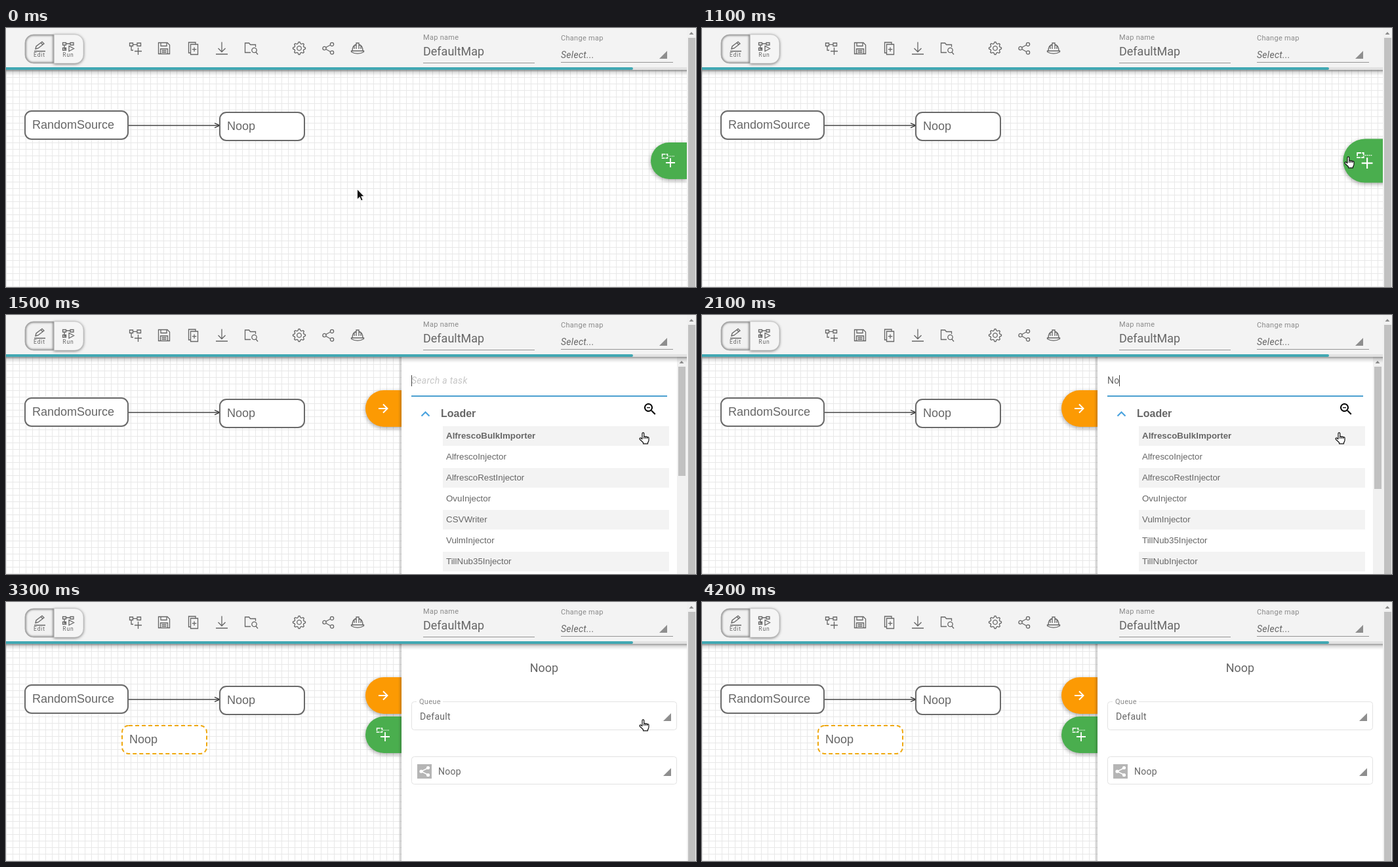
An HTML page for the animation above (5 s loop, 1052 px wide and 396 px high).

```html
<!DOCTYPE html>
<html lang="en">
<head>
<meta charset="utf-8">
<title>Adding a task to a map</title>
<style>
html, body { margin: 0; width: 100%; height: 100%; overflow: hidden; background: #fff; }
svg { display: block; }
text { font-family: Roboto, sans-serif; font-size: 14px; letter-spacing: .3px; fill: #666; white-space: pre; }
.tiny { font-size: 8.5px; letter-spacing: .9px; }
.label { font-size: 11px; fill: #8a8a8a; }
.big { font-size: 18px; letter-spacing: 0; }
.hint { font-style: italic; }
.node, .row, .head { font-family: "Liberation Sans", Arial, sans-serif; letter-spacing: 0; }
.node { font-size: 18px; }
.row { font-size: 13.33px; }
.head { font-size: 16px; }
.bold { font-weight: bold; }
.line { fill: none; stroke: #666; stroke-width: 1.3; }
.lift { filter: drop-shadow(0 2px 3px rgba(0,0,0,.35)); }
</style>
</head>
<body>
<svg id="stage" width="1052" height="396" viewBox="0 0 1052 396">
  <defs>
    <pattern id="grid" width="10" height="10" y="5" patternUnits="userSpaceOnUse">
      <path d="M0 .5H10M.5 0V10" stroke="#e8e8e8"/>
    </pattern>
    <linearGradient id="shade" x2="0" y2="1">
      <stop stop-opacity=".4"/><stop offset=".4" stop-opacity=".13"/><stop offset="1" stop-opacity="0"/>
    </linearGradient>
    <linearGradient id="side">
      <stop stop-opacity="0"/><stop offset="1" stop-opacity=".2"/>
    </linearGradient>
    <clipPath id="pressed"><path d="M73 10H42a13 13 0 0 0-13 13v18a13 13 0 0 0 13 13H73z"/></clipPath>
    <clipPath id="page"><path d="M0 64H1038V396H0z"/></clipPath>
  </defs>
  <rect width="1052" height="396" fill="#fff"/>
  <rect y="64" width="1038" height="332" fill="url(#grid)"/>
  <g id="body"></g>
  <g id="top"></g>
  <g id="tools"></g>
  <g id="cursor"></g>
</svg>
<script>
const LOOP = 5000, STEP = 100;
const get = id => document.getElementById(id);
const rect = (x, y, w, h, fill, more = '') =>
  `<rect x="${x}" y="${y}" width="${w}" height="${h}" fill="${fill}" ${more}/>`;
const text = (x, y, s, cls = '', more = '') => `<text x="${x}" y="${y}" class="${cls}" ${more}>${s}</text>`;
const path = (d, more = 'class="line"') => `<path d="${d}" ${more}/>`;
const at = (x, y, s, more = '') => `<g transform="translate(${x} ${y}) ${more}">${s}</g>`;
const corner = (x, y) => path(`M${x} ${y - 12}v12h-12z`, 'fill="#8e8e8e"');

// Toolbar icons, each drawn around its own centre
const gear = () => {
  let d = '';
  for (let i = 0; i < 32; i++) {
    const a = (i - .5) * Math.PI / 16, r = i % 4 < 2 ? 9.5 : 7.3;
    d += (i ? 'L' : 'M') + (r * Math.cos(a)).toFixed(1) + ' ' + (r * Math.sin(a)).toFixed(1);
  }
  return path(d + 'z') + '<circle r="3.3" class="line"/>';
};
const flow = 'M-8.5-8h5v4.5h-5zM3-8H8.500v4.500H3zM-3.500-5.700H3M-6-3.500V3h3';
const icons = [
  [197, path(flow + 'M4.500-1V10M-1 4.500H10')],
  [241, path('M-8.500-8.500H5L8.500-5V8.500h-17zM-5-8.500v5H4v-5M-5.500 8.500V1h11V8.500M-3.500 3.500h7M-3.500 6h7')],
  [285, path('M-3.500-6h11V9.500h-11zM-3.500 7H-6.500V-9H4v3M2-1.500v6.500M-1.200 1.700h6.500')],
  [329, path('M0-9.500V5M-5.500 0 0 5.500 5.500 0M-9 9H9')],
  [374, path('M-1 6.500h-8.500V-8h6l2 2.500h8V-2') + '<circle cx="4.5" cy="3" r="3.7" class="line"/>' + path('M7 6l3 3.500')],
  [447, gear()],
  [491, path('M-3.500-1.300 3.500-5M-3.500 1.300 3.500 5.200') + [[-5.500, 0], [6, -6], [6, 6.500]].map(([x, y]) =>
    `<circle cx="${x}" cy="${y}" r="2.6" class="line"/>`).join('')],
  [536, path('M-8 4C-8-2-5-5-2-5.800V-8H2v2.200C5-5 8-2 8 4M-9.500 4h19v1.500C4 9-4 9-9.500 5.500zM-2-5.500V1M2-5.500V1M-5-4V1M5-4V1')]
];

const editShape = 'M73 10H42a13 13 0 0 0-13 13v18a13 13 0 0 0 13 13H73z';
const runShape = 'M73 10h32a13 13 0 0 1 13 13v18a13 13 0 0 1-13 13H73z';
get('tools').innerHTML =
  path(runShape, 'fill="#f5f5f5" stroke="#bbb" stroke-width=".6" style="filter:drop-shadow(0 1px 2px rgba(0,0,0,.5))"') +
  path(editShape, 'fill="#f1f1f1"') +
  `<g clip-path="url(#pressed)">${path(editShape, 'fill="none" stroke="#777" stroke-width="3" style="filter:blur(1.7px)"')}</g>` +
  path(editShape, 'fill="none" stroke="#aaa" stroke-width=".8"') +
  path('M45 32l1-4 9-7 3 3-9 7zM53 22.500l3 3M43 35.500h17') +
  at(95, 29, path('M-8.500-6.500h5v3.500h-5zM3-6.500h5v3.500H3zM-3.500-5H3M-6-3V3h3M-8.500 1.500h5V5h-5zM1-1.500 8.500 2.500 1 6.500z')) +
  text(51, 44, 'Edit', 'tiny', 'text-anchor="middle"') + text(95, 44, 'Run', 'tiny', 'text-anchor="middle"') +
  icons.map(([x, s]) => at(x, 31, s)).join('');

function scrollbar(x, y, thumb) {
  return rect(x, y, 15, 396 - y, '#f1f1f1') + path(`M${x + 3.500} ${y + 10}h7l-3.500-4z`, 'fill="#8b8b8b"') +
    rect(x + 2, y + 15, 11, thumb, '#c1c1c1');
}

// The top bar is a little wider while the page has no scrollbar
function topBar(wide) {
  const end = wide ? 1052 : 1038, x = wide ? 849 : 846, right = wide ? 1022 : 1017, bar = wide ? 978 : 956;
  return rect(0, 64, end, 9, 'url(#shade)') + rect(0, 0, end, 60, '#f3f3f3') + rect(0, 60, end, 4, '#e2e2e2') +
    path(`M0 60H${bar - 2}a2 2 0 0 1 0 4H0z`, 'fill="#41a8b3"') +
    text(636, 18, 'Map name', 'label') + text(636, 42, 'DefaultMap', 'big') + rect(636, 53, x - 676, 1, '#949494') +
    text(x, 19, 'Change map', 'label') + text(x, 46, 'Select...', 'hint') + rect(x, 52, right - x, 1, '#949494') +
    corner(right - 9 + (wide ? 1 : 0), 47) + (wide ? '' : scrollbar(1038, 0, 381));
}

const node = (x, y, w, name, more = 'stroke="#6a6a6a"') =>
  rect(x + 1, y + 1, w - 2, 43, '#fff', `rx="10" stroke-width="2" ${more}`) + text(x + 12, y + 28, name, 'node');
const graph = path('M187 149H326', 'stroke="#444" stroke-width="1.3"') +
  path('M318 145.500 326 149 318 152.500', 'fill="none" stroke="#222" stroke-width="1.3"') +
  node(28, 126, 159, 'RandomSource') + node(325, 128, 131, 'Noop');

// Round-ended tab whose right edge sits at x
const tab = (x, y, fill, icon) =>
  path(`M${x} ${y}h-27a28 28 0 0 0 0 56h27z`, `fill="${fill}" class="lift"`) + at(x - 28, y + 28, icon);
const addIcon = path('M-9.500-10h8v6h-8z', 'fill="none" stroke="#fff" stroke-width="1.5" stroke-dasharray="5 1"') +
  path('M0-7H10', 'stroke="#fff" stroke-dasharray="1.5 1"') +
  path('M3-4V10M-4 3H10', 'stroke="#fff" stroke-width="1.8"');
const goIcon = path('M-7 0H6M0-6.500 6.500 0 0 6.500', 'fill="none" stroke="#fff" stroke-width="2"');
const addTab = x => tab(x, 175, '#4aae4e', addIcon);
const hoverTab = path('M1052 169.400h-41a33.600 33.600 0 0 0 0 67.200h41z', 'fill="#4aae4e" class="lift"') +
  at(1010.500, 203, addIcon, 'scale(1.2)');

const zoomOut = path('M15.500 14h-.79l-.28-.27A6.500 6.500 0 1 0 13.730 14.430l.27.28v.79l5 4.990L20.490 19zM9.500 14a4.500 4.500 0 1 1 0-9 4.500 4.500 0 0 1 0 9zM7 9h5v1.200H7z',
  'fill="#000" fill-rule="evenodd"');
const tasks = ['AlfrescoBulkImporter', 'AlfrescoInjector', 'AlfrescoRestInjector', 'OvuInjector',
  'CSVWriter', 'VulmInjector', 'TillNub35Injector', 'TillNubInjector'];
const caretAt = [0, 10.500, 18, 27, 35];

function searchPanel(left, right, query, focus, head, rows) {
  return (query ? '' : text(left + 15, 105, 'Search a task', 'hint', 'style="fill:#c6c6c6"')) +
    text(left + 15, 105, query) + rect(left + 15 + caretAt[query.length], 92, 1, 17, '#444') +
    (focus ? rect(left + 15, 123, right - left - 30, 2, '#4a9fd0') : rect(left + 15, 123, right - left - 30, 1, '#949494')) +
    path(`M${left + 30.500} 154.500l6-6 6 6`, 'fill="none" stroke="#4aa3df" stroke-width="2.2"') +
    text(left + 60, 156, head, 'head bold') + at(right - 53, 132, zoomOut) +
    rows.slice(0, 7).map((name, i) =>
      (i % 2 ? '' : rect(left + 63, 170 + 32 * i, 345, 30, '#f3f3f3')) +
      text(left + 68, 189 + 32 * i, name, i ? 'row' : 'row bold')).join('');
}

const frame = (y, h) => rect(618.500, y + .5, 404, h, '#fff', 'rx="4" stroke="#e2e2e2"');
const settings = text(820.500, 107, 'Noop', 'big', 'text-anchor="middle"') +
  frame(152, 43) + rect(626, 150, 40, 5, '#fff') + text(630, 156, 'Queue', 'label') +
  text(631, 180, 'Default') + corner(1014, 182) +
  frame(236, 42) + rect(627, 248, 22, 22, '#b5b5b5') + text(659, 264, 'Noop') + corner(1014, 266) +
  path('M644 253.500 633 259 644 264.500', 'fill="none" stroke="#fff" stroke-width="1.5"') +
  [[633, 259], [643.500, 253.500], [643.500, 264.500]].map(([x, y]) => `<circle cx="${x}" cy="${y}" r="2.6" fill="#fff"/>`).join('');

function sheet(left, right) {
  return rect(left - 5, 64, 5, 332, 'url(#side)') + rect(left, 64, right - left, 332, '#fff');
}

function body(t, wide) {
  if (t < 1200) return graph + `<g clip-path="url(#page)">${t < 1100 ? addTab(1038) : hoverTab}</g>`;
  const left = wide ? 618 : 603, end = wide ? 1052 : 1038;
  const base = graph + tab(left, 115, '#fc9a03', goIcon);
  if (t >= 3300) {
    return base + node(176, 188, 131, 'Noop', 'stroke="#efa80f" stroke-dasharray="6 4"') +
      addTab(left) + sheet(left, end) + settings;
  }
  const query = 'Noop'.slice(0, t < 1900 ? 0 : t < 2100 ? 1 : Math.floor(t / 100) - 19);
  if (t >= 2400) return base + sheet(left, end) + searchPanel(left, end, 'Noop', true, 'Tool', ['Noop']);
  const filtered = t >= 2000, edge = end - (wide ? 14 : 15);
  const rows = filtered ? tasks.filter(n => n !== 'CSVWriter') : tasks;
  return base + sheet(left, end) + searchPanel(left, edge, query, !wide, 'Loader', rows) +
    scrollbar(edge, 64, filtered ? 187 : 167);
}

const arrow = path('M.5.5V16L4.200 12.500 6.600 18 9 17 6.700 11.500H11z', 'fill="#111" stroke="#fff" stroke-width=".8"');
const hand = path('M5 10.500V2.200a1.400 1.400 0 0 1 2.800 0V7q1.400-.9 2.500.3 1.400-.8 2.300.5 2-.5 2.400 1.200V12.500q-.2 2-1.500 3.500v1.800H6.500V16L1.400 11.300Q.5 9.600 1.800 9q1.200-.3 3.200 2M7.800 7v3M10.300 7.300v2.700M12.600 7.800V10',
  'fill="#fff" stroke="#111" stroke-width="1.2" stroke-linejoin="round"');

// Time, x, y and shape of the pointer
const track = [
  [0, 535, 246, arrow], [600, 600, 240, arrow], [700, 760, 222, arrow], [800, 900, 207, arrow], [900, 974, 202, arrow],
  [1100, 979, 196, hand], [1200, 980, 195, hand], [1300, 977, 190, hand], [1400, 970, 182, hand], [1500, 965, 179, hand],
  [3700, 925, 188, arrow], [3800, 790, 172, arrow], [3900, 640, 142, arrow], [4000, 490, 96, arrow],
  [4100, 369, 57, arrow], [4200, 0, 0, '']
];

let shown = -1;
function draw(now) {
  const t = Math.floor(now % LOOP / STEP) * STEP;
  if (t !== shown) {
    shown = t;
    const wide = t === 1200;
    get('body').innerHTML = body(t, wide);
    get('top').innerHTML = topBar(wide);
    const [, x, y, shape] = track.filter(p => p[0] <= t).pop();
    get('cursor').innerHTML = at(x, y, shape);
  }
  requestAnimationFrame(draw);
}
const start = performance.now();
draw(0);
requestAnimationFrame(function begin() {
  const offset = start;
  const tick = () => { draw.now = performance.now() - offset; };
  tick();
});
</script>
</body>
</html>
```
